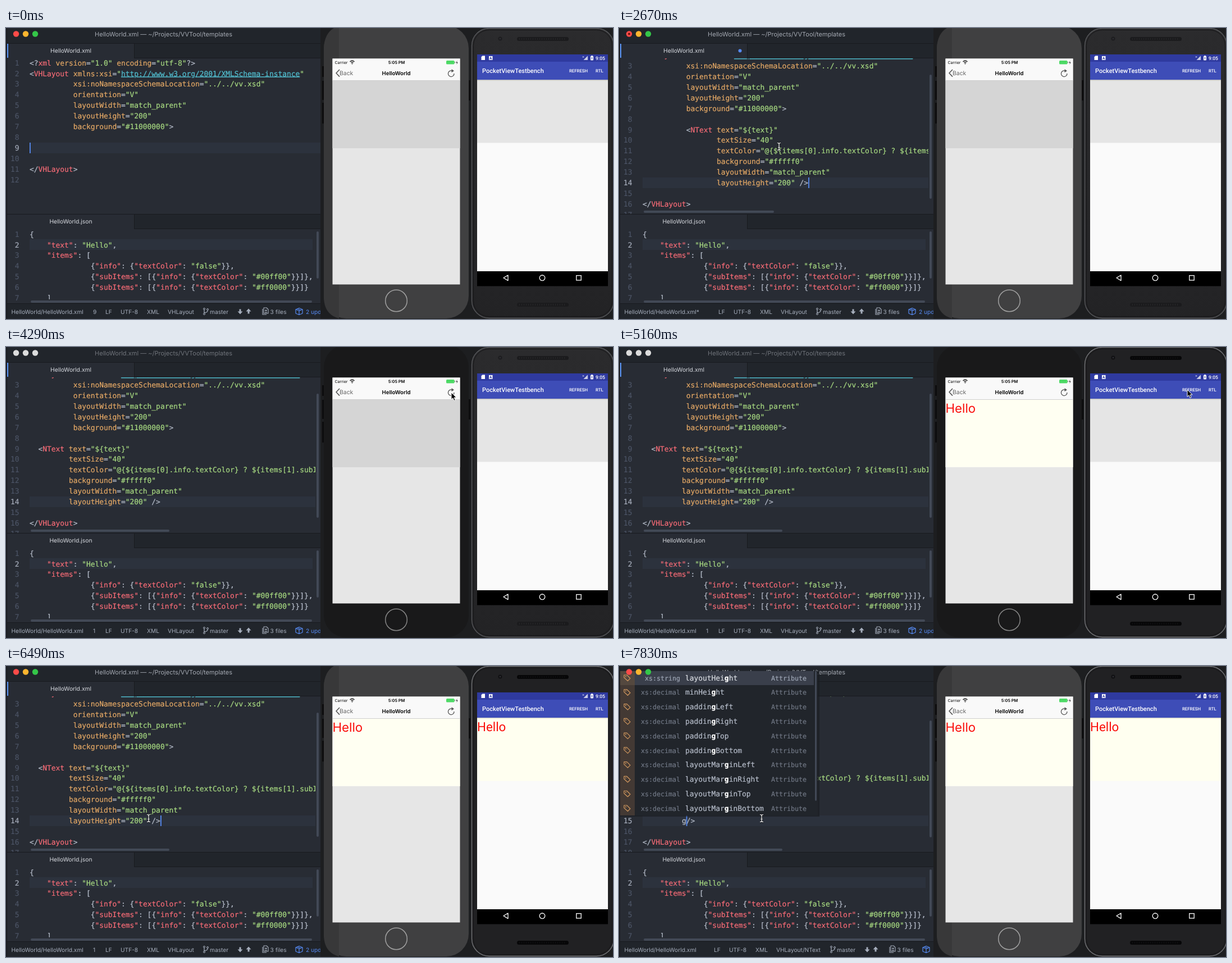
Write an HTML page that moves like this. It is 1081 by 518 pixels and loops after 8 s.

```html
<!DOCTYPE html>
<html lang="en">
<head>
<meta charset="utf-8">
<title>Template live preview</title>
<style>
html, body { margin: 0; width: 1081px; height: 518px; overflow: hidden; background: #1d1e20; }
svg { display: block; }
text { font-family: Inter, "Open Sans", sans-serif; text-rendering: geometricPrecision; }
.mono text, .mono tspan { fill: currentColor; stroke: currentColor; stroke-width: .22px; }
.mono text { font: 12.9px "DejaVu Sans Mono", monospace; color: #b4bbc8; }
.mono .small { font-size: 11.63px; color: #6f7683; }
.mono .picked { color: #d7dae0; }
.mono .small.picked { color: #9da5b4; }
.mono .hit { color: #fff; font-weight: 700; }
.mono .no { color: #4b5364; }
.mono .no.on { color: #a3aab8; }
.mono .tag { color: #f56b76; }
.mono .attr { color: #e2a765; }
.mono .str { color: #a6d880; }
.mono .url { color: #52bfd0; text-decoration: underline; }
.tab { font-size: 10.3px; fill: #d7dae0; }
.bar text { font-size: 10.2px; fill: #a6aebc; }
.droid text { font-family: Roboto, sans-serif; font-weight: 500; fill: #fff; }
.thumb { fill: #424956; }
</style>
</head>
<body>
<svg width="1081" height="518" viewBox="0 0 1081 518">
  <defs>
    <clipPath id="winClip"><rect width="560" height="518"/></clipPath>
    <clipPath id="topClip"><rect y="54" width="560" height="277"/></clipPath>
    <clipPath id="topText"><rect x="40" y="54" width="511" height="277"/></clipPath>
    <clipPath id="lowClip"><rect y="358" width="560" height="128"/></clipPath>
    <clipPath id="lowText"><rect x="40" y="358" width="511" height="125"/></clipPath>
    <linearGradient id="shell" x2="0" y2="1">
      <stop stop-color="#2b2b2d"/><stop offset="1" stop-color="#232325"/>
    </linearGradient>
  </defs>

  <g clip-path="url(#winClip)">
    <rect width="560" height="518" fill="#181a1f"/>
    <rect x="2" width="558" height="518" fill="#282c34"/>
    <rect x="2" width="558" height="27" fill="#21252b"/>
    <g id="tabs"></g>
    <g class="mono" id="code"></g>
    <g class="mono" id="json"></g>
    <rect x="2" y="490" width="558" height="28" fill="#181a1f"/>
    <rect x="2" y="491" width="558" height="27" fill="#21252b"/>
    <g class="bar" id="status"></g>
    <g id="title"></g>
    <g class="mono" id="popup"></g>
    <g id="lights"></g>
  </g>

  <g id="ios"></g>
  <g class="droid" id="droid"></g>
  <g id="mouse"></g>
</svg>

<script>
const LOOP = 8000, CH = 7.766, LINE = 18.9, LEFT = 42;
const PASTE = 2230, SAVE = 3710, PHONE = 4290, PHONE_TEXT = 4580, DROID = 4870,
      DROID_CLICK = 5450, DROID_TEXT = 5600, EDITOR = 6340, CLICK = 6640, ENTER = 7530, TYPE = 7830;

const rect = (x, y, w, h, fill, more = '') =>
  `<rect x="${x}" y="${y}" width="${w}" height="${h}" fill="${fill}" ${more}/>`;
const circle = (x, y, r, fill, more = '') => `<circle cx="${x}" cy="${y}" r="${r}" fill="${fill}" ${more}/>`;
const text = (x, y, s, more = '') => `<text x="${x}" y="${y}" ${more}>${s}</text>`;
const line = (d, color, w = 1.2) =>
  `<path d="${d}" fill="none" stroke="${color}" stroke-width="${w}" stroke-linejoin="round"/>`;
const thumb = (x, y, w, h) => `<rect class="thumb" x="${x}" y="${y}" width="${w}" height="${h}" rx="2"/>`;
const at = (steps, t) => steps.filter(s => s[0] <= t).pop();

const shown = {};
function set(id, html) {
  if (shown[id] !== html) document.getElementById(id).innerHTML = shown[id] = html;
}

// Code editor
const span = (cls, s) => `<tspan class="${cls}">${s}</tspan>`;
function paint(s) {
  const tokens = /("[^"]*"(?=:))|("[^"]*")|((?<=<[?\/]?)\w+)|([\w:]+(?==))|</g;
  return s.replace(tokens, (all, key, str, tag, attr) => {
    if (str && str.startsWith('"http')) return span('str', '"') + span('url', str.slice(1, -1)) + span('str', '"');
    if (str) return span('str', str);
    if (key || tag) return span('tag', all);
    return attr ? span('attr', attr) : '&lt;';
  });
}

function editor({ lines, y, current, width, clip, textClip, caret }) {
  const rowY = i => y + i * LINE;
  let numbers = '', body = '';
  lines.forEach(([col, s], i) => {
    const base = (rowY(i) + 4.6).toFixed(2);
    numbers += text(23.5, base, i + 1, `text-anchor="end" class="no${i === current ? ' on' : ''}"`);
    if (s) body += text((LEFT + col * CH).toFixed(2), base, paint(s));
  });
  const top = Math.round(rowY(current) - 9.5);
  const bar = caret === null ? '' : rect((LEFT + caret * CH).toFixed(2), top, 1.8, 19, '#568af2');
  return `<g clip-path="url(#${clip})">${rect(LEFT, top, width, 19, '#2c323d')}${numbers}</g>
    <g clip-path="url(#${textClip})">${body}${bar}</g>`;
}

const HEAD = [
  [0, '<?xml version="1.0" encoding="utf-8"?>'],
  [0, '<VHLayout xmlns:xsi="http://www.w3.org/2001/XMLSchema-instance"'],
  [10, 'xsi:noNamespaceSchemaLocation="../../vv.xsd"'],
  [10, 'orientation="V"'],
  [10, 'layoutWidth="match_parent"'],
  [10, 'layoutHeight="200"'],
  [10, 'background="#11000000">'],
  [0, '']
];
const ATTRS = [
  'textSize="40"',
  'textColor="@{${items[0].info.textColor} ? ${items[1].subItems[0].info.textColor} : ${items[2].subItems[0].info.textColor}}"',
  'background="#fffff0"',
  'layoutWidth="match_parent"'
];
const TAIL = [[0, ''], [0, '</VHLayout>'], [0, '']];
const INDENT = [[0, 10], [3120, 8], [3270, 6], [3420, 4], [3560, 2]];
const CARET = [[0, 1], [150, 0], [450, 1], [750, 0], [1050, 1], [1340, 0], [PASTE, 1],
  [3850, 0], [EDITOR, 1], [7230, 0], [ENTER, 1]];

function source(t) {
  if (t < PASTE) return [...HEAD, [0, ''], ...TAIL];
  const col = at(INDENT, t)[1], inner = col + 7;
  const last = t < ENTER
    ? [[inner, 'layoutHeight="200" />']]
    : [[inner, 'layoutHeight="200"'], [inner, t < TYPE ? '/>' : 'g/>']];
  return [...HEAD, [col, '<NText text="${text}"'], ...ATTRS.map(s => [inner, s]), ...last, ...TAIL];
}

function caretCol(t) {
  if (t < PASTE) return 0;
  if (t < CLICK) return at(INDENT, t)[1] + 28;
  return t < ENTER ? 28 : t < TYPE ? 9 : 10;
}

function drawCode(t) {
  const pasted = t >= PASTE, entered = t >= ENTER;
  let html = editor({
    lines: source(t),
    y: 62 - (entered ? 51.2 : pasted ? 32.3 : 0),
    current: entered ? 14 : pasted ? 13 : 8,
    width: pasted ? 509 : 518,
    clip: 'topClip', textClip: 'topText',
    caret: at(CARET, t)[1] ? caretCol(t) : null
  });
  if (pasted) {
    html += entered ? thumb(553, 97, 4, 208) : thumb(553, 83, 4, 221);
    html += thumb(44, 325, t < 3560 ? 232 : 247, 4);
  }
  set('code', html);
}

const JSON_LINES = [
  [0, '{'],
  [4, '"text": "Hello",'],
  [4, '"items": ['],
  [14, '{"info": {"textColor": "false"}},'],
  [14, '{"subItems": [{"info": {"textColor": "#00ff00"}}]},'],
  [14, '{"subItems": [{"info": {"textColor": "#ff0000"}}]}'],
  [4, ']']
];
set('json', editor({ lines: JSON_LINES, y: 367, current: 1, width: 504,
  clip: 'lowClip', textClip: 'lowText', caret: null }) +
  thumb(553, 362, 4, 84) + thumb(44, 485, 501, 4));

function tabBar(y, name) {
  return rect(2, y, 558, 27, '#181a1f') + rect(229, y + 1, 331, 25, '#21252b') +
    rect(2, y + 1, 226, 26, '#282c34') + text(115.5, y + 17, name, 'class="tab" text-anchor="middle"');
}

function drawWindow(t) {
  const dirty = t >= PASTE && t < SAVE;
  const active = t < PHONE || t >= EDITOR;
  set('tabs', tabBar(27, 'HelloWorld.xml') + tabBar(331, 'HelloWorld.json') +
    rect(2, 28, 2, 25, '#5e9bff') + (dirty ? circle(215.5, 40.5, 3, '#568af2') : ''));
  set('title', text(280.5, 14.8, 'HelloWorld.xml — ~/Projects/VVTool/templates',
    `text-anchor="middle" font-size="11" fill="${active ? '#a4a9b2' : '#70747b'}"`));
  const colors = active ? ['#fc4b48', '#fdb52f', '#34c648'] : ['#dcdcdc', '#dcdcdc', '#dcdcdc'];
  set('lights', colors.map((c, i) => circle(18 + 17 * i, 10.5, 5.2, c)).join('') +
    (dirty ? circle(18, 10.5, 2, '#6d0f0c') : ''));
}

function drawStatus(t) {
  const dirty = t >= PASTE && t < SAVE, nested = t >= CLICK;
  const d = nested ? -8 : 0, e = nested ? 25 : 0, gray = '#a6aebc', blue = '#568af2';
  const item = (x, s) => text(x, 508.6, s);
  const arrow = (x, dir) => `<path d="M${x - 4.5} 504.5h9l-4.5 ${5 * dir}zM${x - 1.5} 504.5v${-4 * dir}h3v${4 * dir}z" fill="${gray}"/>`;
  const count = nested || dirty ? '' : t < PASTE ? '9' : '1';
  set('status', item(9.5, 'HelloWorld/HelloWorld.xml' + (dirty ? '*' : '')) +
    item(155, count) + item(177 + d, 'LF') + item(204 + d, 'UTF-8') + item(251 + d, 'XML') +
    item(288 + d, nested ? 'VHLayout/NText' : 'VHLayout') +
    `<g transform="translate(${e})">` +
      line('M353 501v7M359 502v1.5q0 2.5-6 3.5', gray) +
      [[353, 500], [353, 509], [359, 501]].map(([x, y]) => circle(x, y, 1.5, '#21252b', `stroke="${gray}"`)).join('') +
      item(363, 'master') + arrow(417, 1) + arrow(432, -1) +
      line('M457 500v10h7M459 498h5l3 3v7h-8zM461 503h4M463 501v4M461 506.500h4', gray, 1.1) +
      item(470.5, '3 files') +
      line('M516 501l6-2.500 6 2.500v7l-6 2.500-6-2.500zl6 2.500 6-2.500M522 503.500v7M519 500l6 2.500', blue, 1.2) +
      (nested ? '' : text(534, 508.6, '2 updates', `style="fill:${blue}"`)) + '</g>');
}

// Completion list
const OPTIONS = ['layoutHeight', 'minHeight', 'paddingLeft', 'paddingRight', 'paddingTop', 'paddingBottom',
  'layoutMarginLeft', 'layoutMarginRight', 'layoutMarginTop', 'layoutMarginBottom'];

function drawPopup(t) {
  if (t < TYPE) return set('popup', '');
  const rows = OPTIONS.map((name, i) => {
    const y = 21 + 25.78 * i, base = y + 4.6, picked = i ? '' : 'picked';
    const icon = `M9 ${y - 5}h5l6 6-4.500 4.500-6.500-6z`;
    return (picked && rect(2, 9, 26, 25, '#54483f') + rect(28, 9, 319, 25, '#3a3f4b')) +
      line(icon, '#d0975e') + circle(12, y - 2.3, 1, '#d0975e') +
      text(109, base, i ? 'xs:decimal' : 'xs:string', `class="small ${picked}" text-anchor="end"`) +
      text(118, base, name.replace('g', span('hit', 'g')), `class="${picked}"`) +
      text(271, base, 'Attribute', `class="small ${picked}"`);
  }).join('');
  set('popup', rect(2, 9, 355, 259, '#181a1f', 'opacity=".6"') + rect(2, 9, 352, 257, '#21252b') +
    rect(2, 9, 26, 257, '#433934') + rows + thumb(349, 9, 3, 231));
}

// Phones
function drawIos(t) {
  const active = t >= PHONE && t < DROID_CLICK, hello = t >= PHONE_TEXT;
  const body = active ? '#19191a' : '#404041';
  const keys = [[563, 68, 19], [563, 94, 34], [563, 133, 37], [823, 93, 36]];
  const label = (x, y, s, size, weight, more = '') => text(x, y, s, `font-size="${size}" font-weight="${weight}" ${more}`);
  set('ios', keys.map(([x, y, h]) => rect(x, y, 4, h, '#0c0c0d')).join('') +
    rect(566, -4, 258, 521, body, 'rx="40"') +
    (active ? '' : '<path d="M593 0V517Q566 510 566 478V36Q567 10 584 0z" fill="#383839"/>') +
    rect(581.5, 54.5, 227, 402, '#e6e6e6') + rect(581.5, 54.5, 227, 39.5, '#f9f9f9') +
    rect(581.5, 93.4, 227, .6, '#b5b5b5') +
    rect(581.5, 94, 227, 120, hello ? '#fffff2' : '#d5d5d5') +
    label(585.5, 63.6, 'Carrier', 7, 400) + label(695.5, 63.8, '5:05 PM', 7.4, 600, 'text-anchor="middle"') +
    line('M612.500 60q4-3.500 8 0M614.500 62q2-1.800 4 0', '#111', 1.3) + circle(616.5, 63.6, .9, '#111') +
    rect(784, 58, 14.5, 6.5, '#4cd964', 'rx="1.500"') + rect(799, 60, 1, 2.5, '#777') +
    '<path d="M803.500 58l-2 4h1.500l-.5 3 2-4h-1.500z" fill="#222"/>' +
    line('M594 74l-6 6.300 6 6.300', '#555', 1.6) + label(594, 84, 'Back', 10.4, 400, 'fill="#666"') +
    label(695, 83.8, 'HelloWorld', 9.6, 600, 'text-anchor="middle"') +
    line('M795 76.500A5.300 5.300 0 1 0 798 81', '#555', 1.3) + '<path d="M793.500 73.200l4.500 3-4.500 3z" fill="#555"/>' +
    (hello ? label(581.5, 116.8, 'Hello', 22.3, 400, 'fill="#fa0f0c"') : '') +
    circle(695, 485.5, 19.3, 'none', `stroke="${active ? '#858585' : '#a0a0a0'}" stroke-width="1.500"`));
}

function grille(y, active) {
  const dark = active ? '#070708' : '#1b1b1d';
  return rect(910, y, 92, 7, dark, 'rx="3.500"') +
    `<path d="M914 ${y + 3.5}h84" stroke="${active ? '#111113' : '#29292b'}" stroke-width="3" stroke-dasharray="1 3"/>`;
}

function drawDroid(t) {
  const active = t >= DROID, hello = t >= DROID_TEXT;
  const label = (x, y, s, size) => text(x, y, s, `font-size="${size}"`);
  const band = (y, h, fill, more) => rect(839, y, 233, h, fill, more);
  set('droid', rect(829.5, .5, 253, 516, active ? '#212123' : 'url(#shell)',
      `rx="31" stroke="${active ? '#77787b' : '#58595c'}" stroke-width="1.300"`) +
    rect(832.5, 3.5, 247, 510, 'none', 'rx="28" stroke="#161618"') +
    circle(880, 19, 3.5, active ? '#111113' : '#1d1d1f') +
    circle(880, 19, 1.3, '#303036') + grille(16, active) + grille(489, active) +
    band(47, 13, '#2f3a9f') + band(60, 32, '#3e4db7') +
    band(92, 341, '#fafafa') + band(92, 112.5, hello ? '#fffff0' : '#e5e5e5') +
    band(92, 1.5, '#000', 'opacity=".15"') + band(433, 26.5, '#000') +
    '<path d="M848.500 49.500h4.500v7.500h-6.500v-5.500z" fill="#fff"/>' + rect(860, 50, 6.5, 7, '#fff') +
    line('M861.500 56l1.700-4.500 1.700 4.500M862 54.500h2.500', '#2f3a9f', .9) +
    '<path d="M1036 49.500v7.500h-7.500z" fill="#fff" opacity=".75"/>' +
    line('M1027 50.500l2 2m0-2l-2 2', '#fff', .9) +
    rect(1041, 50, 5, 7.5, '#fff', 'rx=".7"') + rect(1042.5, 49, 2, 1.5, '#fff') +
    rect(1042.9, 52, 1.2, 3.5, '#2f3a9f') +
    label(1050, 57, '9:05', 8.6) + label(848, 80.2, 'PocketViewTestbench', 11) +
    label(1003, 79.2, 'REFRESH', 7.8) + label(1050, 79.2, 'RTL', 7.8) +
    line('M894 440v9.600l-8-4.800z', '#fff', 1.3) +
    circle(955, 444.8, 4.8, 'none', 'stroke="#fff" stroke-width="1.300"') +
    rect(1015.8, 440.6, 8.4, 8.4, 'none', 'stroke="#fff" stroke-width="1.300"') +
    (hello ? text(839, 115.8, 'Hello', 'font-size="22.300" style="fill:#fa0f0c;font-weight:400"') : ''));
}

// Pointer: [start, x, y]
const PATH = [
  [750, 462, 103], [900, 420, 140], [1050, 340, 185], [1200, 250, 220], [1340, 180, 238], [1490, 145, 234],
  [1640, 128, 225], [1790, 122, 220], [2370, 180, 222], [2520, 245, 215], [2670, 285, 211],
  [SAVE, 400, 182], [3850, 600, 128], [4000, 745, 92], [4140, 793, 81],
  [4730, 860, 79], [DROID, 960, 77], [5020, 1005, 76], [5160, 1012, 76],
  [5750, 1006, 92], [5890, 880, 150], [6040, 640, 220], [6190, 410, 260], [EDITOR, 275, 271], [6490, 254, 271]
];

function drawMouse(t) {
  const step = at(PATH, t);
  if (!step) return set('mouse', '');
  const [, x, y] = step;
  const beam = 'M-3-6.500q3 0 3 2q0-2 3-2M0-5V5M-3 6.500q3 0 3-2q0 2 3 2M-1.500 1.500h3';
  const shape = x < 560
    ? line(beam, '#15171b', 2.8) + line(beam, '#fff', 1.2)
    : '<path d="M0 0v12.500l2.900-2.700 2 4.700 2.200-1-2-4.500h4z" fill="#000" stroke="#fff"/>';
  set('mouse', `<g transform="translate(${x} ${y})">${shape}</g>`);
}

const start = performance.now();
function frame() {
  const t = (performance.now() - start) % LOOP;
  for (const draw of [drawCode, drawWindow, drawStatus, drawPopup, drawIos, drawDroid, drawMouse]) draw(t);
  requestAnimationFrame(frame);
}
frame();
</script>
</body>
</html>
```
